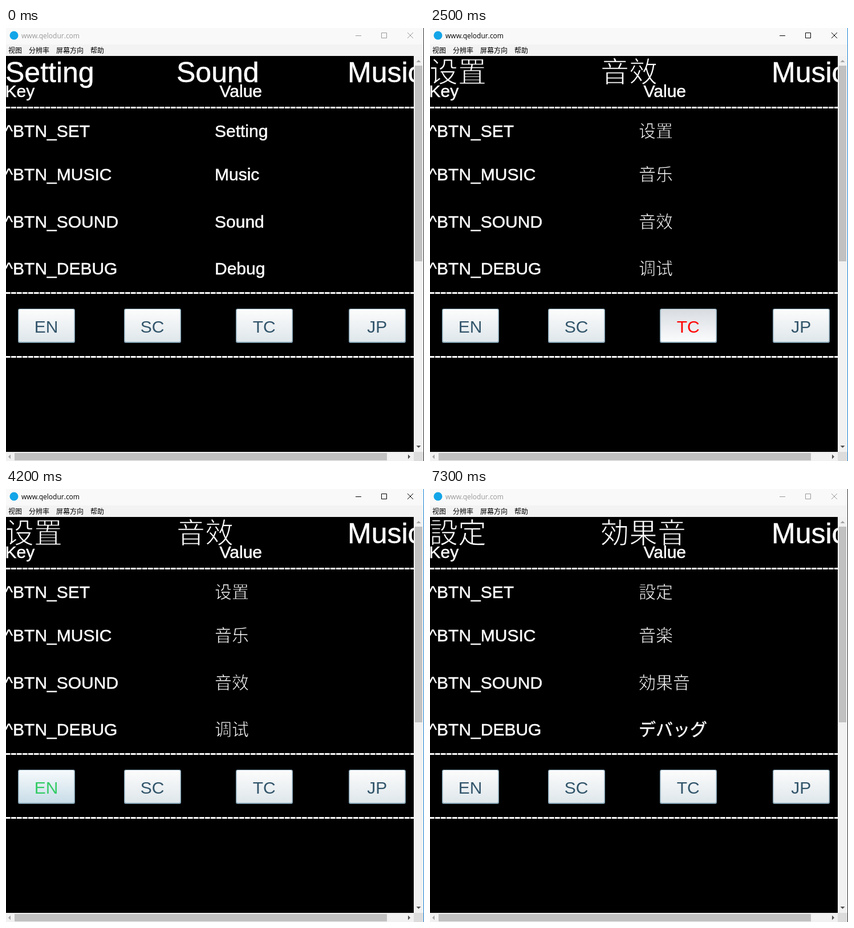
These frames come from a looping animation (733 by 759 pixels, 7400 ms). An HTML page:

```html
<!DOCTYPE html>
<html lang="en">
<head>
<meta charset="utf-8">
<title>Language switch</title>
<style>
  html, body { margin: 0; width: 100%; height: 100%; overflow: hidden; background: #f8f8f8; }
  svg { display: block; width: 733px; height: 759px; }
  .game { font: 300 30px "Liberation Sans", "Noto Sans CJK SC", "Noto Sans CJK", sans-serif; fill: #fff; stroke: #fff; stroke-width: .5px; }
  .game:lang(zh-Hant) { font-family: "Liberation Sans", "Noto Sans CJK TC", "Noto Sans CJK", sans-serif; }
  .game:lang(ja) { font-family: "Liberation Sans", "Noto Sans CJK JP", "Noto Sans CJK", sans-serif; }
  .heading { font-size: 50px; }
  .thin { stroke: #000; stroke-width: .025em; }
  .button { stroke: none; }
  .rule { stroke-width: 3px; stroke-dasharray: 8.7 1.3; }
  .menu { font: 12px "Noto Sans CJK SC", "Noto Sans CJK", sans-serif; fill: #000; }
  .title { font: 12px "Open Sans", sans-serif; }
</style>
</head>
<body>
<svg id="stage" viewBox="0 0 733 759" xmlns="http://www.w3.org/2000/svg"></svg>
<script>
const LOOP = 7400;
const stage = document.getElementById("stage");

const languages = {
  EN: { lang: "en", set: "Setting", music: "Music", sound: "Sound", debug: "Debug" },
  SC: { lang: "zh-Hans", set: "设置", music: "音乐", sound: "音效", debug: "调试" },
  TC: { lang: "zh-Hant", set: "設置", music: "音樂", sound: "音效", debug: "調試" },
  JP: { lang: "ja", set: "設定", music: "音楽", sound: "効果音", debug: "デバッグ" }
};
const rows = { set: 191, music: 267, sound: 350, debug: 432 };
const buttons = { EN: 21, SC: 207, TC: 403, JP: 601 };
const skins = {
  up:   { top: "#fcfcfc", bottom: "#dfe7eb", text: "#32556b" },
  over: { top: "#f6fafc", bottom: "#c9dde8", text: "#33cc66" },
  down: { top: "#d8dce1", bottom: "#fbfcfd", text: "#ff0000" }
};

// [start, language, button under the pointer, its state]
const steps = [
  [0, "EN"], [1100, "EN", "EN", "over"], [1400, "EN", "EN", "down"],
  [1500, "EN", "EN", "over"], [1600, "EN"],
  [1800, "EN", "SC", "over"], [1900, "EN", "SC", "down"], [2000, "SC"],
  [2400, "SC", "TC", "over"], [2500, "SC", "TC", "down"], [2600, "TC"],
  [2800, "TC", "JP", "over"], [3100, "TC", "JP", "down"], [3200, "JP"],
  [3500, "JP", "TC", "over"], [3600, "JP", "TC", "down"],
  [3700, "TC", "TC", "over"], [3800, "TC"],
  [4000, "TC", "SC", "over"], [4100, "TC", "SC", "down"],
  [4200, "SC", "EN", "over"], [4400, "SC", "EN", "down"], [4500, "EN", "EN", "over"],
  [4600, "EN", "SC", "over"], [4700, "EN", "SC", "down"],
  [4900, "SC", "TC", "over"], [5100, "SC"],
  [5300, "SC", "JP", "over"], [5400, "SC", "JP", "down"],
  [5500, "JP", "JP", "over"], [5600, "JP"]
];

const rect = (x, y, w, h, fill, extra = "") =>
  `<rect x="${x}" y="${y}" width="${w}" height="${h}" fill="${fill}" ${extra}/>`;
const text = (x, y, content, extra = "") => `<text x="${x}" y="${y}" ${extra}>${content}</text>`;
const arrow = (x, y, angle, fill) =>
  `<path d="M-4 2L0 -2L4 2Z" transform="translate(${x} ${y}) rotate(${angle})" fill="${fill}"/>`;

// Han characters are drawn with finer strokes than the other scripts.
const word = (x, y, content, style = "") =>
  text(x, y, content, `class="${style} ${/\p{Script=Han}/u.test(content) ? "thin" : ""}"`);

const gradients = "<defs>" + Object.entries(skins).map(([name, s]) =>
  `<linearGradient id="${name}" x2="0" y2="1"><stop stop-color="${s.top}"/>` +
  `<stop offset="1" stop-color="${s.bottom}"/></linearGradient>`).join("") + "</defs>";

function button(label, state) {
  const x = buttons[label];
  return '<g class="button">' + rect(x, 492, 100, 60, "#86a5b6", 'rx="3"') +
    rect(x + 1.5, 493, 97, 57, `url(#${state})`, 'rx="2"') +
    text(x + 49.7, 534, label, `text-anchor="middle" style="fill:${skins[state].text}"`) + "</g>";
}

function game(language, hovered, state) {
  const words = languages[language];
  const headings = [words.set, words.sound, "Music"];
  return rect(0, 49, 715, 694, "#000") +
    `<svg width="715" height="743"><g class="game" lang="${words.lang}">` +
    headings.map((heading, i) => word(300 * i - 1, 95, heading, "heading")).join("") +
    text(-1.5, 121, "Key") + text(374.5, 121, "Value") +
    [139.5, 464.5, 576.5].map(y => `<path class="rule" d="M-1 ${y}H715"/>`).join("") +
    Object.entries(rows).map(([key, y]) =>
      text(-2, y, "^BTN_" + key.toUpperCase()) + word(366, y, words[key])).join("") +
    Object.keys(buttons).map(b => button(b, b === hovered ? state : "up")).join("") +
    "</g></svg>";
}

function windowFrame(active) {
  const ink = active ? "#000" : "#999";
  return rect(0, 0, 733, 29, "#f9f9f9") + rect(0, 29, 733, 20, "#f3f3f3") +
    '<circle cx="14" cy="13" r="7.5" fill="#12a5e8"/>' +
    text(27, 18, "www.qelodur.com", `class="title" fill="${ink}"`) +
    `<path d="M613 13.5h10M658.5 8.5h9v9h-9zM704 8l10 10M714 8l-10 10" fill="none" stroke="${ink}"/>` +
    '<g class="menu" lang="zh-Hans">' +
    text(4, 44, "视图") + text(40, 44, "分辨率") + text(88, 44, "屏幕方向") + text(148, 44, "帮助") + "</g>";
}

function scrollbars(active, thumbHovered) {
  return rect(715, 49, 17, 694, "#f1f1f1") + rect(0, 743, 715, 16, "#f1f1f1") +
    rect(715, 743, 17, 16, "#dcdcdc") +
    rect(717, 66, 13, 343, thumbHovered ? "#a8a8a8" : "#c1c1c1") +
    rect(15, 745, 653, 13, "#c1c1c1") +
    arrow(723.5, 58, 0, "#a3a3a3") + arrow(723.5, 734, 180, "#505050") +
    arrow(6, 751.5, -90, "#a3a3a3") + arrow(707, 751.5, 90, "#505050") +
    rect(732, 0, 1, 759, active ? "#1883d7" : "#333");
}

let shown = "";
function draw() {
  const t = performance.now() % LOOP;
  const [start, ...pose] = steps.findLast(step => step[0] <= t);
  const active = t >= 1400 && t < 7300;
  const thumbHovered = t >= 6000 && t < 6100;
  const key = [start, active, thumbHovered].join();
  if (key !== shown) {
    shown = key;
    stage.innerHTML = gradients + windowFrame(active) + game(...pose) + scrollbars(active, thumbHovered);
  }
  requestAnimationFrame(draw);
}
draw();
</script>
</body>
</html>
```
